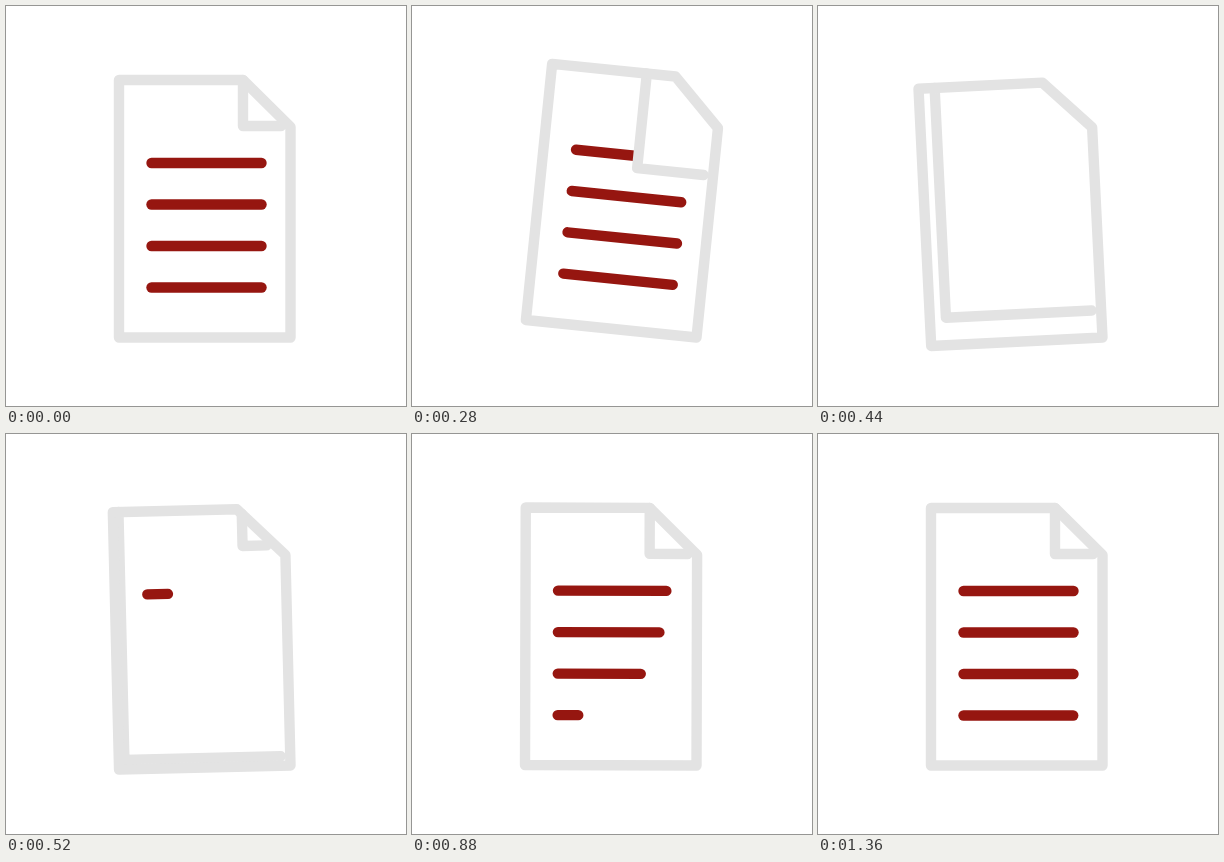
Recreate the animation shown at these times as an HTML page. Size 400 px wide and 400 px high, loop 1.96 s.

```html
<!DOCTYPE html>
<html lang="en">
<head>
<meta charset="utf-8">
<title>Page turn</title>
<style>
  html, body { margin: 0; width: 100%; height: 100%; overflow: hidden; background: #fff; }
  svg { display: block; width: 100vw; height: 100vh; }
  path { fill: none; stroke-width: 10.4; stroke-linecap: round; stroke-linejoin: round; }
  .edge { stroke: #e3e3e3; }
  .ink { stroke: #961610; }
  .paper { fill: #fff; stroke: none; }
</style>
</head>
<body>
<svg viewBox="0 0 400 400">
  <g id="page">
    <g id="oldInk"></g>
    <g id="flap">
      <path id="flapFill" class="paper"/>
      <path id="flapEdge" class="edge"/>
    </g>
    <g id="newInk"></g>
    <path id="fold" class="edge"/>
    <path class="edge" d="M113 74H237L284.5 121V331.5H113Z"/>
  </g>
</svg>
<script>
const LOOP = 1960, STEP = 40;
const LEFT = 145.5, LENGTH = 110;
const ROWS = [157, 198.5, 240, 281.5];
const CORNER = [237, 120];

// [time, degrees] of the swing around the bottom right corner
const SWING = [[0, 0], [245, 7], [404, -3], [705, 2], [920, 0], [LOOP, 0]];
// steep start, long settling tail
const CURVE = [[0, 0], [.071, .186], [.143, .477], [.286, .755],
               [.357, .823], [.5, .923], [.714, .985], [1, 1]];

const $ = id => document.getElementById(id);
const mix = (a, b, k) => a + (b - a) * k;

function segment(points, x) {
  let i = 0;
  while (i < points.length - 2 && x >= points[i + 1][0]) i++;
  return i;
}

function slope(i) {
  const a = CURVE[Math.max(i - 1, 0)];
  const b = CURVE[Math.min(i + 1, CURVE.length - 1)];
  return (b[1] - a[1]) / (b[0] - a[0]);
}

function settle(t, start, duration) {
  const u = (t - start) / duration;
  if (u <= 0) return 0;
  if (u >= 1) return 1;
  const i = segment(CURVE, u), [x0, y0] = CURVE[i], [x1, y1] = CURVE[i + 1];
  const w = x1 - x0, k = (u - x0) / w, k2 = k * k, k3 = k2 * k;
  return mix(y0, y1, 3 * k2 - 2 * k3)
    + w * slope(i) * (k3 - 2 * k2 + k)
    + w * slope(i + 1) * (k3 - k2);
}

function angle(t) {
  const i = segment(SWING, t), [t0, a] = SWING[i], [t1, b] = SWING[i + 1];
  return mix(a, b, (1 - Math.cos(Math.PI * (t - t0) / (t1 - t0))) / 2);
}

function addRows(group) {
  return ROWS.map(() => {
    const p = document.createElementNS("http://www.w3.org/2000/svg", "path");
    p.setAttribute("class", "ink");
    return $(group).appendChild(p);
  });
}

const draw = (el, d) => el.setAttribute("d", d);
const show = (el, on) => el.setAttribute("visibility", on ? "visible" : "hidden");
const row = (y, k) => `M${LEFT} ${y}h${LENGTH * k}`;
const foldTop = x => Math.max(74, x - 163);
const foldPath = (x, y) => `M${x} ${foldTop(x)}V${y}H${Math.min(275, y + 155)}`;

const oldRows = addRows("oldInk"), newRows = addRows("newInk");
oldRows.forEach((el, i) => draw(el, row(ROWS[i], 1)));

function render(t) {
  $("page").setAttribute("transform", `rotate(${angle(t)} 284.5 331.5)`);

  const turn = settle(t, 240, 480);
  const x = mix(CORNER[0], 113, turn), y = mix(CORNER[1], 331.5, turn);
  draw($("flapEdge"), foldPath(x, y));
  draw($("flapFill"), `M${x} ${foldTop(x)}V${y}H284.5V121L237 74Z`);
  show($("flap"), turn < 1);
  show($("oldInk"), turn < 1);

  const grow = settle(t, 440, 320);
  draw($("fold"), foldPath(mix(253, CORNER[0], grow), mix(90, CORNER[1], grow)));
  show($("fold"), grow > 0);

  newRows.forEach((el, i) => {
    const k = settle(t, 480 + 120 * i, 560);
    draw(el, row(ROWS[i], k));
    show(el, k > 0);
  });
}

const begin = performance.now();
function tick() {
  const t = (performance.now() - begin) % LOOP;
  render(Math.floor(t / STEP) * STEP);
  requestAnimationFrame(tick);
}
tick();
</script>
</body>
</html>
```
